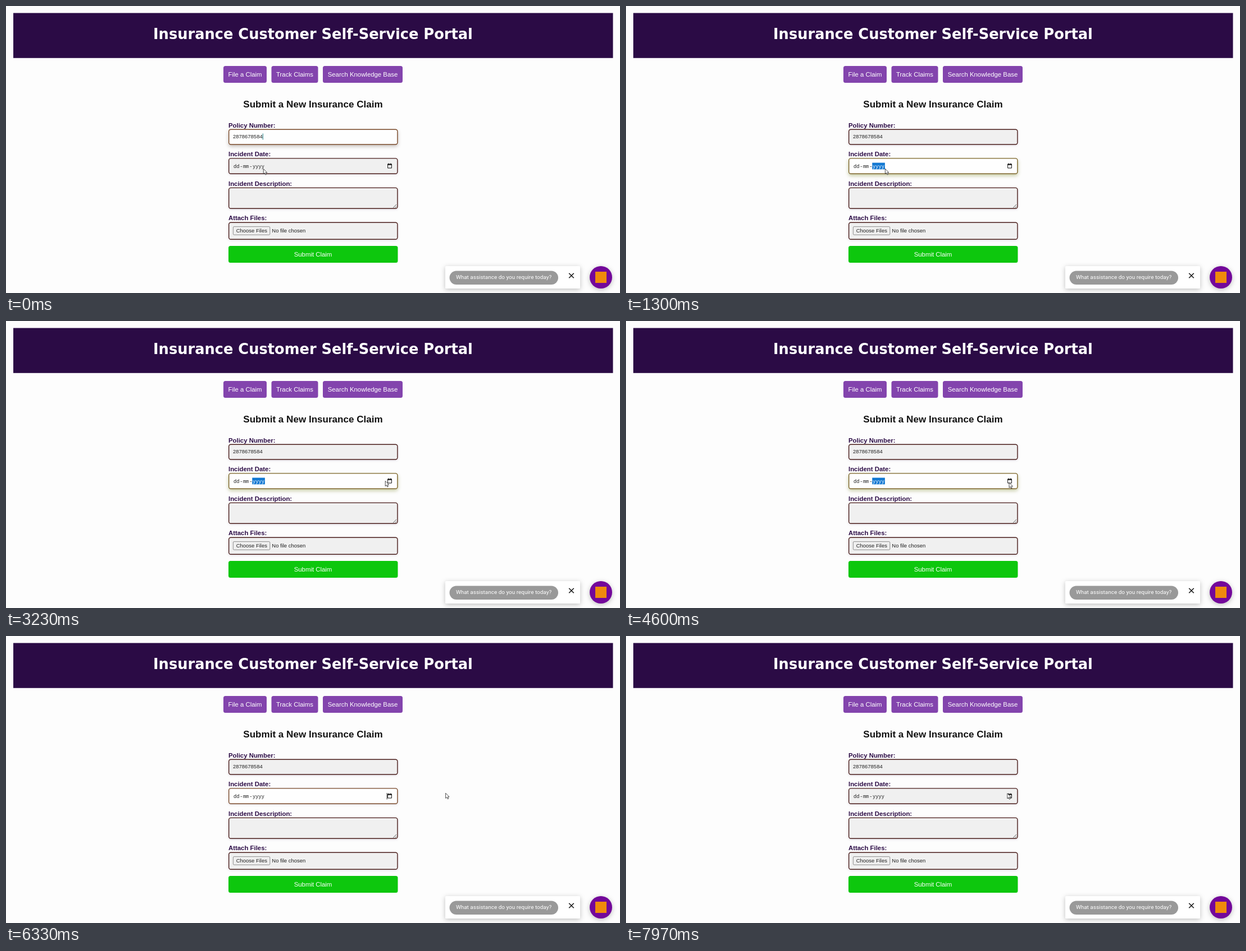
Recreate the animation shown at these times as an HTML page. Size 1093 px wide and 512 px high, loop 8000 ms.

```html
<!DOCTYPE html>
<html lang="en">
<head>
<meta charset="utf-8">
<title>Claim form</title>
<style>
  html, body { margin: 0; width: 100%; height: 100%; overflow: hidden; background: #fdfdfd; }
  svg { display: block; width: 100%; height: 100%; }
  text { font: 11.38px "Liberation Sans", Arial, sans-serif; fill: #111; }
  .mid { text-anchor: middle; }
  .white { fill: #fff; }
  .title { font: bold 25.7px "DejaVu Sans", Verdana, sans-serif; }
  .sub { font-size: 17.07px; font-weight: bold; }
  .label { font-weight: bold; fill: #2b0b45; }
  .small { font-size: 9.48px; fill: #222; }
  .mono { font: 500 8.7px "Noto Sans Mono", monospace; fill: #222; }
  .chat { font: 9.96px Roboto, sans-serif; }
  .nav rect { fill: #8344ad; }
  .field { fill: #f0f0f0; stroke: #4b1f1c; stroke-width: 1.4; filter: drop-shadow(0 1px 2px rgba(43, 11, 69, .14)); }
  .field.focus { fill: #fefefe; stroke: #7a4a2a; }
  .field.glow { filter: drop-shadow(0 3px 3px rgba(60, 40, 30, .28)); }
  #date.glow { stroke: #7c6428; filter: drop-shadow(0 3px 3px rgba(110, 120, 20, .38)); }
  .card { fill: #fff; filter: drop-shadow(0 2px 4px rgba(0, 0, 0, .25)); }
</style>
</head>
<body>
<svg viewBox="0 0 1093 512" preserveAspectRatio="none">
  <rect x="13" y="12.5" width="1067.5" height="80.3" fill="#2b0b45"/>
  <text class="title white mid" x="546.5" y="59">Insurance Customer Self-Service Portal</text>

  <g class="nav">
    <rect x="387" y="107" width="77" height="30" rx="3.5"/>
    <rect x="472.5" y="107" width="83" height="30" rx="3.5"/>
    <rect x="564" y="107" width="142" height="30" rx="3.5"/>
    <text class="white mid" x="425.5" y="125.8">File a Claim</text>
    <text class="white mid" x="514" y="125.8">Track Claims</text>
    <text class="white mid" x="635" y="125.8">Search Knowledge Base</text>
  </g>

  <text class="sub mid" x="546.5" y="181">Submit a New Insurance Claim</text>

  <text class="label" x="396" y="216.7">Policy Number:</text>
  <rect id="policy" class="field" x="396.7" y="220.2" width="300.2" height="26.8" rx="3.5"/>
  <text class="small" x="404" y="236.3">2878678584</text>
  <path id="caret" d="M457.3 227.5v11" stroke="#1c7f86"/>

  <text class="label" x="396" y="268.3">Incident Date:</text>
  <rect id="date" class="field" x="396.7" y="271.9" width="300.2" height="27.4" rx="3.5"/>
  <rect id="mark" x="438.3" y="279.6" width="22.6" height="11.8" fill="#1278d2"/>
  <text class="mono" y="289"><tspan x="405">dd</tspan><tspan x="416.2">-</tspan><tspan x="421.9">mm</tspan><tspan x="433.2">-</tspan><tspan id="year" x="439.1">yyyy</tspan></text>
  <path d="M679.6 282.3h6.8v6.8h-6.8z" fill="none" stroke="#111"/>
  <path d="M679.1 281.8h7.8v2h-7.8zM680.6 280.6h1v1.5h-1zM684.4 280.6h1v1.5h-1z" fill="#111"/>
  <path id="ring" d="M678.2 280v11.5" stroke="#111" stroke-width=".9"/>

  <text class="label" x="396" y="321">Incident Description:</text>
  <rect class="field" x="396.7" y="324.4" width="300.2" height="36.9" rx="3.5"/>
  <path d="M689 360l6-6M692.5 360l2.5-2.5" stroke="#555" stroke-width=".9"/>

  <text class="label" x="396" y="382.3">Attach Files:</text>
  <rect class="field" x="396.7" y="386.2" width="300.2" height="30" rx="3.5"/>
  <rect x="404.4" y="393.6" width="65.4" height="14.6" rx="1.5" fill="#efefef" stroke="#767676" stroke-width=".8"/>
  <text class="small mid" x="437.3" y="404.2">Choose Files</text>
  <text class="small" x="473.3" y="404.2">No file chosen</text>

  <rect x="396" y="428" width="301.5" height="30" rx="3.5" fill="#0dc70d"/>
  <text class="white mid" x="546.5" y="446.6">Submit Claim</text>

  <rect class="card" x="782" y="464" width="240" height="40" rx="1.5"/>
  <rect x="789.5" y="472.5" width="193.5" height="24.5" rx="12.2" fill="#999"/>
  <text class="chat white mid" x="886" y="487.4">What assistance do you require today?</text>
  <path d="M1002.2 476.7l8.6 8.6M1010.8 476.7l-8.6 8.6" stroke="#111" stroke-width="1.5"/>
  <circle class="card" cx="1059" cy="484" r="20" style="fill:#73089a"/>
  <rect x="1049" y="474" width="20" height="20" fill="#f08a0c"/>

  <path id="pointer" d="M0 0v9.2l2.1-1.9 1.5 3.2 1.6-.7-1.5-3.1h2.8z" fill="#fff" stroke="#222" stroke-width=".8"/>
</svg>
<script>
  const LOOP = 8000, DATE_CLICK = 260, ICON_CLICK = 5000, BLUR = 6700;
  // pointer stops: time, x, y
  const path = [
    [0, 458.3, 290.5], [1250, 458.3, 290.5], [2000, 692.3, 285.5], [2600, 692.3, 285.5],
    [3150, 675.2, 285.5], [3700, 675.2, 285.5], [4300, 682, 288.3], [5200, 682, 288.3],
    [5900, 782.6, 280.3], [6900, 782.6, 280.3], [7700, 678.8, 280.8], [LOOP, 678.8, 280.8]
  ];
  const el = id => document.getElementById(id);
  const show = (id, on) => el(id).style.visibility = on ? 'visible' : 'hidden';

  function pointerAt(t) {
    const i = path.findIndex(p => p[0] > t);
    const [t0, x0, y0] = path[i - 1], [t1, x1, y1] = path[i];
    const k = (t - t0) / (t1 - t0), e = k * k * (3 - 2 * k);
    return [x0 + (x1 - x0) * e, y0 + (y1 - y0) * e];
  }

  function draw(t) {
    const policy = t < DATE_CLICK;
    const year = !policy && t < ICON_CLICK;
    const icon = t >= ICON_CLICK && t < BLUR;
    el('policy').classList.toggle('focus', policy);
    el('policy').classList.toggle('glow', policy);
    el('date').classList.toggle('focus', year || icon);
    el('date').classList.toggle('glow', year);
    show('caret', policy);
    show('mark', year);
    show('ring', icon);
    el('year').style.fill = year ? '#fff' : '';
    el('pointer').setAttribute('transform', `translate(${pointerAt(t)})`);
  }

  const start = performance.now();
  function tick() {
    draw((performance.now() - start) % LOOP);
    requestAnimationFrame(tick);
  }
  tick();
</script>
</body>
</html>
```
